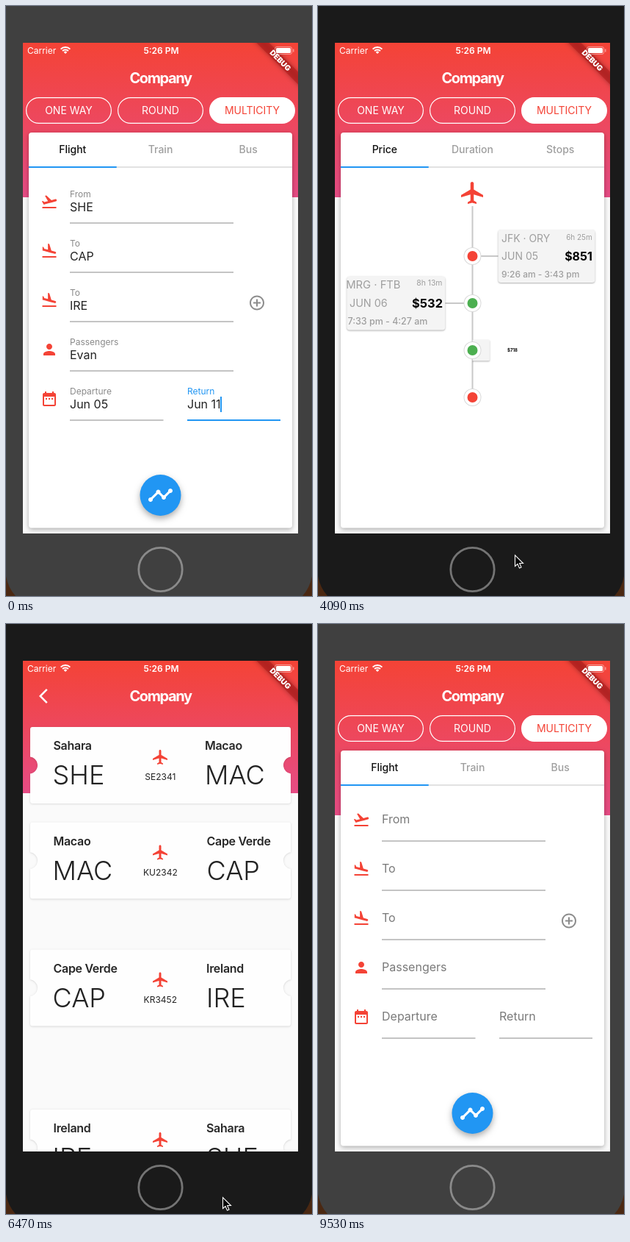
Recreate the animation shown at these times as an HTML page with a canvas. Size 417 px wide and 802 px high, loop 9590 ms.

```html
<!DOCTYPE html>
<html lang="en">
<head>
<meta charset="utf-8">
<title>Flight search</title>
<style>
html, body { margin: 0; width: 100%; height: 100%; overflow: hidden; background: #4a2812; }
canvas { display: block; width: 417px; height: 802px; }
</style>
</head>
<body>
<canvas id="stage"></canvas>
<script>
const W = 417, H = 802, LOOP = 9590, MID = 210.5;
const RED = '#f44336', BLUE = '#2196f3', GREEN = '#4caf50', GREY = '#9e9e9e', LINE = '#c8c8c8';
const dpr = window.devicePixelRatio || 1;

function makeCanvas(el) {
  el.width = W * dpr;
  el.height = H * dpr;
  const ctx = el.getContext('2d');
  ctx.scale(dpr, dpr);
  return ctx;
}
const main = makeCanvas(document.getElementById('stage'));
const layer = makeCanvas(document.createElement('canvas'));
let c = main;

// Icons on a 24 unit grid
const ICON = {
  plane: 'M22 16v-2l-8.5-5V3.5c0-.83-.67-1.5-1.5-1.5s-1.5.67-1.5 1.5V9L2 14v2l8.5-2.5V19L8 20.5V22l4-1 4 1v-1.5L13.5 19v-5.5L22 16z',
  takeoff: 'M2.5 19h19v2h-19zm19.57-9.36c-.21-.8-1.04-1.28-1.84-1.06L14.92 10l-6.9-6.43-1.93.51 4.14 7.17-4.97 1.33-1.97-1.54-1.45.39 1.82 3.16.77 1.33 1.6-.43 5.31-1.42 4.35-1.16L21 11.49c.81-.23 1.28-1.05 1.07-1.85z',
  land: 'M2.5 19h19v2h-19zm7.18-5.73l4.35 1.16 5.31 1.42c.8.21 1.62-.26 1.84-1.06.21-.8-.26-1.62-1.06-1.84l-5.31-1.42-2.76-9.02L10.12 2v8.28L5.15 8.95l-.93-2.32-1.45-.39v5.17l1.6.43 5.31 1.43z',
  person: 'M12 12c2.21 0 4-1.79 4-4s-1.79-4-4-4-4 1.79-4 4 1.79 4 4 4zm0 2c-2.67 0-8 1.34-8 4v2h16v-2c0-2.66-5.33-4-8-4z',
  date: 'M9 11H7v2h2v-2zm4 0h-2v2h2v-2zm4 0h-2v2h2v-2zm2-7h-1V2h-2v2H8V2H6v2H5c-1.11 0-1.99.9-1.99 2L3 20c0 1.1.89 2 2 2h14c1.1 0 2-.9 2-2V6c0-1.1-.9-2-2-2zm0 16H5V9h14v11z',
  add: 'M13 7h-2v4H7v2h4v4h2v-4h4v-2h-4V7zm-1-5C6.48 2 2 6.48 2 12s4.48 10 10 10 10-4.48 10-10S17.52 2 12 2zm0 18c-4.41 0-8-3.59-8-8s3.59-8 8-8 8 3.59 8 8-3.59 8-8 8z',
  route: 'M23 8c0 1.1-.9 2-2 2-.18 0-.35-.02-.51-.07l-3.56 3.55c.05.16.07.34.07.52 0 1.1-.9 2-2 2s-2-.9-2-2c0-.18.02-.36.07-.52l-2.55-2.55c-.16.05-.34.07-.52.07s-.36-.02-.52-.07l-4.55 4.56c.05.16.07.33.07.51 0 1.1-.9 2-2 2s-2-.9-2-2 .9-2 2-2c.18 0 .35.02.51.07l4.56-4.55C8.02 9.36 8 9.18 8 9c0-1.1.9-2 2-2s2 .9 2 2c0 .18-.02.36-.07.52l2.55 2.55c.16-.05.34-.07.52-.07s.36.02.52.07l3.55-3.56C19.02 8.35 19 8.18 19 8c0-1.1.9-2 2-2s2 .9 2 2z',
  check: 'M9 16.17L4.83 12l-1.42 1.41L9 19 21 7l-1.41-1.41z',
  back: 'M11.67 3.87L9.9 2.1 0 12l9.9 9.9 1.77-1.77L3.54 12z',
  finger: 'M6.2 4c3.6-2 8-2 11.6 0M3.5 9.2c4-5.6 13-5.6 17 0M9.7 21.3c-2.2-2.2-3.2-3.9-3.2-6.6 0-3 2.5-5.2 5.5-5.2s5.5 2.2 5.5 5.2M4.3 16.6C2.5 11 6.5 7 12 7c4.7 0 8.5 3.2 8.5 7.7 0 3.4-4.8 3.6-5.4.3-.3-4-6-4-6 0 0 4 3 6.5 6.3 6.7M12 14.7c0 3.2 2.4 5 6 4.6'
};
for (const k in ICON) ICON[k] = new Path2D(ICON[k]);
const ARROW = new Path2D('M0 0V15L3.5 12 6 17.6 8.5 16.5 6.1 11H11z');

// Easing
const clamp = v => Math.min(1, Math.max(0, v));
const ramp = (t, start, len) => clamp((t - start) / len);
const lerp = (a, b, p) => a + (b - a) * p;
const decelerate = p => 1 - (1 - p) ** 2;
function bezier(x1, y1, x2, y2) {
  const at = (a, b, u) => 3 * a * u * (1 - u) ** 2 + 3 * b * u * u * (1 - u) + u ** 3;
  return x => {
    let lo = 0, hi = 1;
    for (let i = 0; i < 24; i++) {
      const u = (lo + hi) / 2;
      if (at(x1, x2, u) < x) lo = u; else hi = u;
    }
    return at(y1, y2, (lo + hi) / 2);
  };
}
const easeOut = bezier(0, 0, 0.58, 1);
const fastOutSlowIn = bezier(0.4, 0, 0.2, 1);
const elastic = (p, period) => p <= 0 ? 0 : p >= 1 ? 1 :
  1 + 2 ** (-10 * p) * Math.sin((p - period / 4) * 2 * Math.PI / period);

// Drawing helpers
function text(str, x, cy, size, color, { weight = 400, align = 'left', track = 0 } = {}) {
  c.font = `${weight} ${size}px Inter, "Liberation Sans", sans-serif`;
  c.letterSpacing = track + 'px';
  c.textAlign = align;
  c.fillStyle = color;
  c.fillText(str, x, cy + size * 0.36);
}
function icon(name, cx, cy, size, color) {
  c.save();
  c.translate(cx - size / 2, cy - size / 2);
  c.scale(size / 24, size / 24);
  c.fillStyle = color;
  c.fill(ICON[name]);
  c.restore();
}
function rect(x, y, w, h, color) {
  c.fillStyle = color;
  c.fillRect(x, y, w, h);
}
function disc(x, y, r, color) {
  c.beginPath();
  c.arc(x, y, r, 0, 7);
  c.fillStyle = color;
  c.fill();
}
function pill(x, y, w, h, r) {
  c.beginPath();
  c.roundRect(x, y, w, h, r);
}
function shadow(alpha, blur, dy) {
  c.shadowColor = `rgba(0,0,0,${alpha})`;
  c.shadowBlur = blur * dpr;
  c.shadowOffsetY = dy * dpr;
}
function clipRect(x, y, w, h) {
  c.beginPath();
  c.rect(x, y, w, h);
  c.clip();
}

function fab(y, scale, name, t, tap) {
  if (scale <= 0) return;
  c.save();
  c.translate(MID, y);
  c.scale(scale, scale);
  c.save();
  shadow(0.32, 9, 4);
  disc(0, 0, 28, BLUE);
  c.restore();
  const p = ramp(t, tap, 300);
  if (p > 0 && p < 1) disc(0, 0, 28 * Math.sqrt(p), `rgba(255,255,255,${0.22 * (1 - p * p)})`);
  if (name === 'finger') {
    c.translate(-12, -12);
    c.strokeStyle = '#fff';
    c.lineWidth = 1;
    c.lineCap = 'round';
    c.stroke(ICON.finger);
  } else {
    icon(name, 0, 0, 36, '#fff');
  }
  c.restore();
}

function header(height) {
  rect(23, 50, 375, 667, '#fafafa');
  const g = c.createLinearGradient(0, 50, 0, 50 + height);
  g.addColorStop(0, RED);
  g.addColorStop(1, '#e64c85');
  rect(23, 50, 375, height, g);
  text('Company', MID, 98, 20, '#fff', { weight: 700, align: 'center', track: -1.4 });
}

function homeFrame(tabs) {
  header(210);
  ['ONE WAY', 'ROUND', 'MULTICITY'].forEach((label, i) => {
    const x = 27 + 125 * i, on = i === 2;
    pill(x + 0.6, 124.6, 115.8, 34.8, 17.4);
    c.lineWidth = 1.2;
    c.strokeStyle = c.fillStyle = '#fff';
    c.stroke();
    if (on) c.fill();
    text(label, x + 58.5, 142, 14, on ? RED : '#fff', { align: 'center' });
  });
  c.save();
  shadow(0.32, 6, 2);
  pill(31, 172, 359, 537.5, 4);
  c.fillStyle = '#fff';
  c.fill();
  c.restore();
  rect(31, 218, 359, 2, '#e2e2e2');
  rect(31, 218, 119.7, 2, BLUE);
  tabs.forEach((label, i) => text(label, 90.8 + 119.7 * i, 195, 14, i ? GREY : '#111',
    { weight: 500, align: 'center' }));
}

const FIELDS = [
  ['takeoff', 'From', 'SHE'], ['land', 'To', 'CAP'], ['land', 'To', 'IRE'],
  ['person', 'Passengers', 'Evan'], ['date', 'Departure', 'Jun 05']
];
function field(label, value, x, y, w, focus) {
  if (value) {
    text(label, x, y - 10.5, 12, focus ? BLUE : '#8a8a8a');
    text(value, x, y + 7.5, 16, '#222');
  } else {
    text(label, x, y - 0.5, 16, '#7a7a7a');
  }
  rect(x, y + 28, w, 2, focus ? BLUE : '#c4c4c4');
}
function formPage(t, filled) {
  homeFrame(['Flight', 'Train', 'Bus']);
  FIELDS.forEach(([name, label, value], i) => {
    const y = 266 + 67 * i;
    icon(name, 59, y, 24, RED);
    field(label, filled && value, 87, y, i === 4 ? 127.5 : 223);
  });
  field('Return', filled && 'Jun 11', 247, 534, 127, filled);
  icon('add', 342, 403.5, 24, '#8c8c8c');
  if (filled) {
    const beat = Math.floor(t / 490);
    const p = easeOut(ramp(t, beat * 490, 250));
    c.globalAlpha = beat % 2 ? p : 1 - p;
    rect(292, 531, 2, 21, BLUE);
    c.globalAlpha = 1;
  }
  fab(665, 1, 'route', t, 1490);
}

const STOPS = [
  ['JFK · ORY', 'JUN 05', '6h 25m', '$851', '9:26 am - 3:43 pm', RED],
  ['MRG · FTB', 'JUN 06', '8h 13m', '$532', '7:33 pm - 4:27 am', GREEN],
  ['ERT · TVS', 'JUN 09', '2h 30m', '$718', '11:50 am - 2:30 pm', GREEN],
  ['KKR · RTY', 'JUN 11', '5h 45m', '$663', '10:26 am - 4:10 pm', RED]
];
const HALF = 179.5;

function stopCard(stop, i, t) {
  const q = (t - 3560 - 250 * i) / 600;
  if (q <= 0) return;
  const left = i % 2 === 1, y = 340 + 64 * i;
  const part = (from, to, period = 0.95) => elastic((q - from) / (to - from), period);
  const [route, date, duration, price, hours] = stop;

  c.save();
  clipRect(left ? 31 : MID, y - 42, HALF, 84);
  const len = 39.5 * clamp(q / 0.2);
  rect(left ? MID - len : MID, y - 1, len, 2, LINE);

  const s = part(0, 0.9, 0.8);
  const margin = 8 + (1 - s) * (HALF - 8) + 70;
  c.save();
  c.translate(left ? 31 + margin : 389.5 - margin, y);
  c.scale(s, s);
  shadow(0.3, 2, 1);
  pill(-66, -36, 132, 72, 4);
  c.fillStyle = '#f4f4f4';
  c.fill();
  c.restore();
  c.restore();

  const label = (str, a, size, align, cy, color, weight) => {
    if (a < 0.03) return;
    const outer = (align === 'left') === left;
    const m = outer ? 16 + (1 - a) * (HALF - 16) : a * 39.5;
    const base = align === 'left' ? (left ? 31 : MID) : (left ? MID : 390);
    text(str, align === 'left' ? base + m : base - m, cy, size * a, color, { weight, align });
  };
  const top = (a, size) => y - 32 + (1 - a) * 40 + 0.597 * size * a;
  const slow = part(0.05, 0.95), late = part(0.1, 1);
  label(duration, slow, 10, 'right', top(slow, 10), GREY);
  label(route, late, 14, 'left', top(late, 14), GREY);
  label(date, part(0.1, 0.8), 14, 'left', y, GREY);
  label(price, part(0, 0.9), 16, 'right', y, '#000', 700);
  label(hours, slow, 12, 'left', y + 32 - (1 - slow) * 8 - 7.16 * slow, GREY, 500);
}

function pricePage(t) {
  homeFrame(['Price', 'Duration', 'Stops']);
  c.save();
  clipRect(31, 220, 359, 489);
  const size = lerp(60, 36, easeOut(ramp(t, 1800, 340)));
  const cy = lerp(693 - size / 2, 254, fastOutSlowIn(ramp(t, 2630, 400)));
  rect(MID - 1, cy + size / 2, 2, 256, LINE);
  icon('plane', MID - 0.5, cy, size, RED);
  STOPS.forEach((stop, i) => stopCard(stop, i, t));
  STOPS.forEach((stop, i) => {
    const y = lerp(721, 340 + 64 * i, easeOut(ramp(t, 2830 + 100 * i, 200)));
    disc(MID, y, 12, '#d8d8d8');
    disc(MID, y, 11, '#fff');
    disc(MID, y, 7, stop[5]);
  });
  c.restore();
  fab(665, easeOut(ramp(t, 4310, 300)), 'check', t, 5480);
}

const TICKETS = [
  ['Sahara', 'SHE', 'Macao', 'MAC', 'SE2341', 271],
  ['Macao', 'MAC', 'Cape Verde', 'CAP', 'KU2342', 273.5],
  ['Cape Verde', 'CAP', 'Ireland', 'IRE', 'KR3452', 273],
  ['Ireland', 'IRE', 'Sahara', 'SHE', 'MR4321', 273]
];
function ticket([from, a, to, b, code, x2], y) {
  const mid = y + 52, half = Math.PI / 2;
  c.save();
  shadow(0.16, 2.5, 0.6);
  c.beginPath();
  c.moveTo(36, y);
  c.arcTo(388, y, 388, y + 4, 3);
  c.arc(389.5, mid, 11.5, -half - 0.13, half + 0.13, true);
  c.arcTo(388, y + 104, 380, y + 104, 3);
  c.arcTo(33, y + 104, 33, y + 100, 3);
  c.arc(31.5, mid, 11.5, half - 0.13, -half + 0.13, true);
  c.arcTo(33, y, 36, y, 3);
  c.closePath();
  c.fillStyle = '#fefefe';
  c.fill();
  c.restore();
  const name = { weight: 600, track: -0.3 };
  text(from, 64.5, y + 25.5, 16, '#262626', name);
  text(to, x2, y + 25.5, 16, '#262626', name);
  text(a, 63.5, y + 65, 36, '#222', { weight: 300 });
  text(b, x2, y + 65, 36, '#222', { weight: 300 });
  icon('plane', 210, y + 41, 24, RED);
  text(code, 210.3, y + 68, 12, '#222', { align: 'center' });
}
function ticketsPage(t) {
  const e = t - 5787;
  header(180);
  icon('back', 57, 98, 24, '#fff');
  TICKETS.forEach((item, i) => {
    const y = 140 + 116 * i + 800 * (1 - decelerate(ramp(e, 110 * i, 660)));
    if (y < 720) ticket(item, y);
  });
  fab(673, decelerate(ramp(e, 770, 330)), 'finger', t, 8300);
}

function statusBar() {
  text('Carrier', 29, 60.5, 12, '#fff');
  text('5:26 PM', 211.5, 60.5, 12, '#fff', { weight: 600, align: 'center' });
  c.strokeStyle = '#fff';
  c.lineWidth = 2;
  c.lineCap = 'butt';
  for (const r of [5.6, 9]) {
    c.beginPath();
    c.arc(81, 65, r, -2.36, -0.78);
    c.stroke();
  }
  c.beginPath();
  c.moveTo(81, 65);
  c.arc(81, 65, 3.2, -2.36, -0.78);
  c.fillStyle = '#fff';
  c.fill();

  c.save();
  c.translate(398, 50);
  c.rotate(Math.PI / 4);
  c.save();
  shadow(0.5, 6, 0);
  rect(-60, 28, 120, 12, 'rgba(183,28,28,.63)');
  c.restore();
  text('DEBUG', 0, 34, 10.2, '#fff', { weight: 900, align: 'center' });
  c.restore();

  pill(366.5, 55.5, 23, 10, 2.5);
  c.strokeStyle = 'rgba(255,255,255,.45)';
  c.lineWidth = 1;
  c.stroke();
  pill(368, 57, 20, 7, 1.5);
  c.fillStyle = '#fff';
  c.fill();
  rect(391, 58.5, 1.5, 4, 'rgba(255,255,255,.45)');
}

function bezel(light) {
  rect(0, 0, W, H, '#4a2812');
  c.beginPath();
  c.moveTo(0, 0);
  c.lineTo(W, 0);
  c.lineTo(W, 775);
  c.quadraticCurveTo(414, 791, 404, H);
  c.lineTo(13, H);
  c.quadraticCurveTo(3, 791, 0, 775);
  c.fillStyle = light ? '#404040' : '#1a1a1a';
  c.fill();
  c.beginPath();
  c.arc(MID, 766, 29.7, 0, 7);
  c.lineWidth = 2.8;
  c.strokeStyle = light ? '#8a8a8a' : '#747474';
  c.stroke();
}

// Pointer path: time, x, y
const POINTER = [
  [1490, 211, 668], [1950, 211, 668], [2400, 268, 746], [5090, 268, 746], [5140, 262, 735],
  [5400, 211, 668], [5780, 211, 668], [6070, 276, 745], [6120, 294, 777], [6180, 295, 779],
  [7400, 295, 779], [8000, 211, 670], [8600, 211, 670], [9110, 236, 804]
];
function pointer(t) {
  const i = POINTER.findIndex(k => k[0] > t);
  if (i < 1) return;
  const a = POINTER[i - 1], b = POINTER[i], p = ramp(t, a[0], b[0] - a[0]);
  c.save();
  c.translate(lerp(a[1], b[1], p) + 0.5, lerp(a[2], b[2], p) + 0.5);
  c.fillStyle = '#000';
  c.strokeStyle = '#fff';
  c.lineWidth = 1.1;
  c.fill(ARROW);
  c.stroke(ARROW);
  c.restore();
}

function draw(t) {
  c = main;
  bezel(t < 1490 || t >= 9530);
  c.save();
  clipRect(23, 50, 375, 667);
  const shown = Math.min(ramp(t, 5787, 300), 1 - ramp(t, 8500, 300));
  if (shown < 1) {
    if (t < 1800 || t >= 8500) formPage(t, t < 1800);
    else pricePage(t);
  }
  if (shown > 0) {
    c = layer;
    ticketsPage(t);
    c = main;
    c.globalAlpha = shown;
    c.drawImage(layer.canvas, 0, 0, W, H);
    c.globalAlpha = 1;
  }
  statusBar();
  c.restore();
  pointer(t);
}

const begin = performance.now();
function tick() {
  draw((performance.now() - begin) % LOOP);
  requestAnimationFrame(tick);
}
tick();
</script>
</body>
</html>
```
